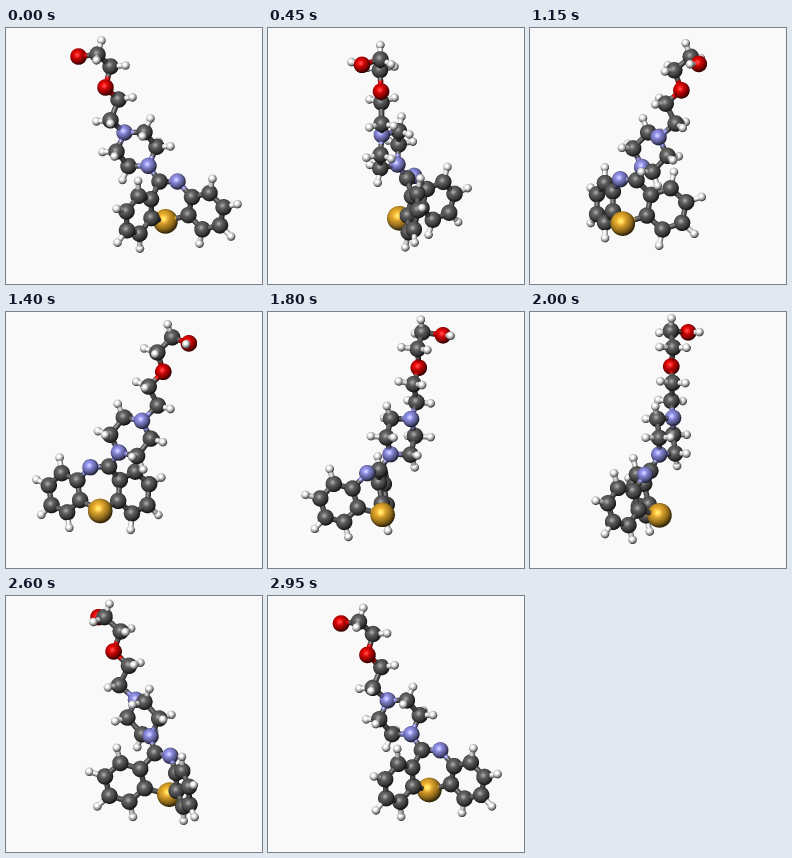
A matplotlib script for the animation above (3 s loop, 256 by 256 pixels).

```python
import itertools
import numpy as np
import matplotlib.pyplot as plt
from matplotlib.animation import FuncAnimation

SIZE, FRAMES, STEP_MS = 256, 60, 50
SS = 3                      # supersampling
TILT = 0.18                 # sine of the camera pitch
COS_T = np.sqrt(1 - TILT ** 2)
CENTER = 128.5
STICK = 2.7
BG = np.array([250, 250, 250]) / 255

# element: (radius, colour)
STYLE = {
    "C": (8.2, (0.38, 0.38, 0.38)),
    "H": (4.3, (0.94, 0.94, 0.94)),
    "N": (8.2, (0.55, 0.55, 0.88)),
    "O": (8.3, (0.86, 0.02, 0.02)),
    "S": (12.3, (0.89, 0.66, 0.17)),
}

LIGHT = np.array([-0.28, -0.38, 0.88])
LIGHT /= np.linalg.norm(LIGHT)
HALF = LIGHT + np.array([0, 0, 1])
HALF /= np.linalg.norm(HALF)

atoms = []                  # (element, position)


def add(element, *points):
    atoms.extend((element, np.array(p, float)) for p in points)


def add_ring(center, a, b):
    """Benzene ring; the first and last corners are the fused ones."""
    c, a, b = (np.array(v, float) for v in (center, a, b))
    for k, v in enumerate((a, b, b - a, -a, -b, a - b)):
        add("C", c + v)
        if 0 < k < 5:
            add("H", c + 1.79 * v)


def add_mirrored(element, center, *points):
    for p in points:
        add(element, p, 2 * np.array(center) - p)


# side chain
add("O", (-56, 28.4, -2), (-29, 58.6, 2))
add("C", (-37, 24.7, 7), (-24, 38.5, -3), (-16, 72.3, -7), (-24, 92, -1))
add("H", (-56, 27, -15), (-33, 11.3, 4), (-38, 28, 21), (-9, 36.3, 4),
    (-25, 37.5, -18), (-2, 69, -1), (-15.6, 71, -22), (-38, 94, -6),
    (-24, 92.5, 14))

# six-membered chair, symmetric about its centre
CHAIR = (2, 122.5, -10)
add_mirrored("N", CHAIR, (-10, 106, -11))
add_mirrored("C", CHAIR, (10, 104.5, -4.3), (22, 120.7, -13.4))
add_mirrored("H", CHAIR, (16, 91, -5.5), (8, 106, 10),
             (36, 119, -6), (24, 118.5, -28))

# fused rings
add("C", (25, 154, -5))
add("N", (43, 154.7, -9.5))
add("S", (31, 196.3, -19))
add_ring((71.5, 182.8, -0.6), (-14, -13.5, -3.7), (3.6, -18.8, 3.9))
add_ring((4.5, 183.2, 17), (12, -13.8, -9.9), (-0.5, -19.9, 5.6))

KIND = [e for e, _ in atoms]
POS = np.array([p for _, p in atoms])


def bonded(i, j):
    hydrogens = (KIND[i] + KIND[j]).count("H")
    reach = (30, 19, 0)[hydrogens]
    return np.linalg.norm(POS[i] - POS[j]) < reach


BONDS = [p for p in itertools.combinations(range(len(atoms)), 2) if bonded(*p)]


def project(angle):
    """Turn about the vertical axis, then pitch: screen x, y and depth."""
    x, y, z = POS.T
    c, s = np.cos(angle), np.sin(angle)
    near = z * c - x * s
    return np.column_stack([CENTER + x * c + z * s,
                            y + 0.5 + TILT * near,
                            COS_T * near - TILT * y / COS_T])


def shade(color, nx, ny, nz):
    diffuse = np.clip(nx * LIGHT[0] + ny * LIGHT[1] + nz * LIGHT[2], 0, 1)
    shine = np.clip(nx * HALF[0] + ny * HALF[1] + nz * HALF[2], 0, 1) ** 25
    lit = (0.24 + 0.8 * diffuse)[..., None] * np.array(color)
    return np.clip(lit + 0.28 * shine[..., None], 0, 1)


class Canvas:
    def __init__(self):
        n = SIZE * SS
        self.rgb = np.tile(BG, (n, n, 1))
        self.depth = np.full((n, n), -1e9)

    def window(self, lo, hi):
        lo = np.clip(np.floor(np.array(lo) * SS).astype(int), 0, SIZE * SS)
        hi = np.clip(np.ceil(np.array(hi) * SS).astype(int), 0, SIZE * SS)
        ys, xs = np.mgrid[lo[1]:hi[1], lo[0]:hi[0]]
        box = np.s_[lo[1]:hi[1], lo[0]:hi[0]]
        return box, (xs + 0.5) / SS, (ys + 0.5) / SS

    def paint(self, box, hit, depth, color, normal):
        hit = hit & (depth > self.depth[box])
        self.depth[box][hit] = depth[hit]
        self.rgb[box][hit] = shade(color, *(n[hit] for n in normal))

    def sphere(self, p, r, color):
        box, xs, ys = self.window(p[:2] - r, p[:2] + r)
        dx, dy = xs - p[0], ys - p[1]
        h2 = r * r - dx * dx - dy * dy
        h = np.sqrt(np.maximum(h2, 0))
        self.paint(box, h2 > 0, p[2] + h, color, (dx / r, dy / r, h / r))

    def stick(self, a, b, r, color):
        length = np.linalg.norm(b - a)
        d = (b - a) / length
        box, xs, ys = self.window(np.minimum(a, b)[:2] - r,
                                  np.maximum(a, b)[:2] + r)
        wx, wy = xs - a[0], ys - a[1]
        along = wx * d[0] + wy * d[1]
        qa = max(1 - d[2] ** 2, 1e-6)
        qb = -along * d[2]
        qc = wx ** 2 + wy ** 2 - along ** 2 - r * r
        disc = qb ** 2 - qa * qc
        t = (-qb + np.sqrt(np.maximum(disc, 0))) / qa
        s = along + t * d[2]
        hit = (disc > 0) & (s >= 0) & (s <= length)
        normal = ((wx - s * d[0]) / r, (wy - s * d[1]) / r, (t - s * d[2]) / r)
        self.paint(box, hit, a[2] + t, color, normal)

    def image(self):
        return self.rgb.reshape(SIZE, SS, SIZE, SS, 3).mean(axis=(1, 3))


def render(i):
    pts = project(2 * np.pi * i / FRAMES)
    canvas = Canvas()
    for p, kind in zip(pts, KIND):
        canvas.sphere(p, *STYLE[kind])
    for j, k in BONDS:
        mid = (pts[j] + pts[k]) / 2
        for end in (j, k):
            canvas.stick(pts[end], mid, STICK, STYLE[KIND[end]][1])
    return canvas.image()


fig = plt.figure(figsize=(2.56, 2.56), dpi=100, facecolor=tuple(BG))
ax = fig.add_axes([0, 0, 1, 1])
ax.axis("off")
picture = ax.imshow(render(0), interpolation="nearest", aspect="auto")


def update(i):
    picture.set_data(render(i))
    return [picture]


anim = FuncAnimation(fig, update, frames=FRAMES, interval=STEP_MS,
                     repeat=True, repeat_delay=0, blit=False)
plt.show()
```
